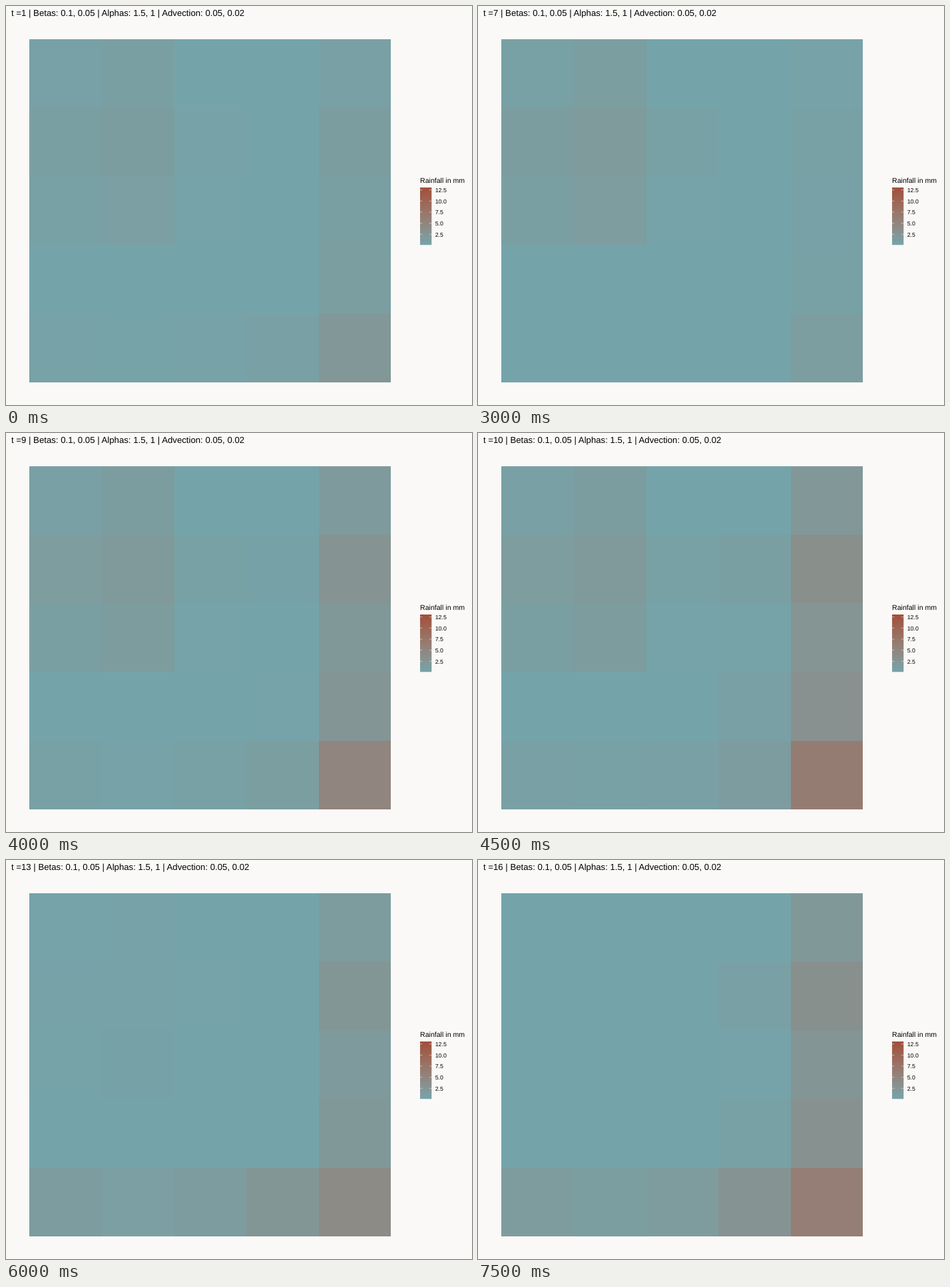
Write an HTML page that moves like this. It is 700 by 600 pixels and loops after 8 s.

```html
<!DOCTYPE html>
<html lang="en">
<head>
<meta charset="utf-8">
<title>Rainfall grid</title>
<style>
  html, body { margin: 0; width: 100%; height: 100%; overflow: hidden; background: #faf9f7; }
  svg { display: block; font-family: "Liberation Sans", Arial, sans-serif; text-rendering: geometricPrecision; }
</style>
</head>
<body>
<svg id="stage" width="700" height="600">
  <linearGradient id="scale" x1="0" y1="1" x2="0" y2="0"></linearGradient>
  <text id="title" x="8" y="15.4" font-size="13.2"></text>
  <text x="622" y="266" font-size="10.6">Rainfall in mm</text>
  <rect x="622" y="272.9" width="17.3" height="86.4" fill="url(#scale)"/>
</svg>
<script>
const stage = document.getElementById('stage');
const title = document.getElementById('title');
const STEP = 500, STEPS = 16, N = 5;

// Strength of the three rain sources over time, in percent of the scale
const keys = [
  { t: 1, east: 16, south: 5, plume: 9 },
  { t: 7, east: 8, south: 0, plume: 12 },
  { t: 8, east: 26, south: 5, plume: 13 },
  { t: 10, east: 49, south: 10, plume: 13 },
  { t: 11, east: 31, south: 14, plume: 5 },
  { t: 13, east: 31, south: 18, plume: 3 },
  { t: 14, east: 31, south: 27, plume: 0 },
  { t: 16, east: 46, south: 20, plume: 0 }
];
const eastProfile = [0.32, 0.54, 0.39, 0.48, 1];

function add(tag, attrs, parent = stage) {
  const el = document.createElementNS('http://www.w3.org/2000/svg', tag);
  for (const key in attrs) el.setAttribute(key, attrs[key]);
  return parent.appendChild(el);
}

const rainColor = percent => `color-mix(in lab, #a14e3b ${percent}%, #74a4aa)`;

function strengths(t) {
  const next = Math.max(1, keys.findIndex(k => k.t >= t));
  const a = keys[next - 1], b = keys[next];
  const f = (t - a.t) / (b.t - a.t);
  const mix = name => a[name] + (b[name] - a[name]) * f;
  return { east: mix('east'), south: mix('south'), plume: mix('plume') };
}

function rain({ east, south, plume }, c, r) {
  const edge = east * eastProfile[r];
  if (c === N - 1) return edge;
  if (r === N - 1) return south * (0.37 + 0.15 * (c - 1) ** 2);
  const spill = c === N - 2 ? Math.max(0, edge - 17) * 0.7 : 0;
  const spread = 1 - (c - 0.8) ** 2 / 2.1 - (r - 1.1) ** 2 / 3.6;
  return spill + plume * Math.max(0, spread);
}

const edgeX = i => Math.ceil(35 + i * 108.6);
const edgeY = i => Math.floor(50.3 + i * 103.2);
const cells = Array.from({ length: N * N }, (_, i) => {
  const c = i % N, r = Math.floor(i / N);
  const el = add('rect', {
    x: edgeX(c), y: edgeY(r),
    width: edgeX(c + 1) - edgeX(c), height: edgeY(r + 1) - edgeY(r)
  });
  return { el, c, r };
});

// Colour bar with ticks and labels
const scale = document.getElementById('scale');
for (let p = 0; p <= 100; p += 5) {
  add('stop', { offset: p / 100 }, scale).style.stopColor = rainColor(p);
}
for (let i = 0; i < 5; i++) {
  const y = 276.7 + i * 16.65;
  add('path', { d: `M622 ${y}h3.5m10.3 0h3.5`, stroke: '#fff', 'stroke-width': 0.5 });
  add('text', { x: 644.7, y: y + 3.2, 'font-size': 8.8 }).textContent = (12.5 - i * 2.5).toFixed(1);
}

function show(t) {
  title.textContent = `t =${t} | Betas: 0.1, 0.05 | Alphas: 1.5, 1 | Advection: 0.05, 0.02`;
  const now = strengths(t);
  for (const { el, c, r } of cells) el.style.fill = rainColor(rain(now, c, r));
}

let shown = 0;
function tick() {
  const t = Math.floor(performance.now() / STEP) % STEPS + 1;
  if (t !== shown) show(shown = t);
  requestAnimationFrame(tick);
}
tick();
</script>
</body>
</html>
```
